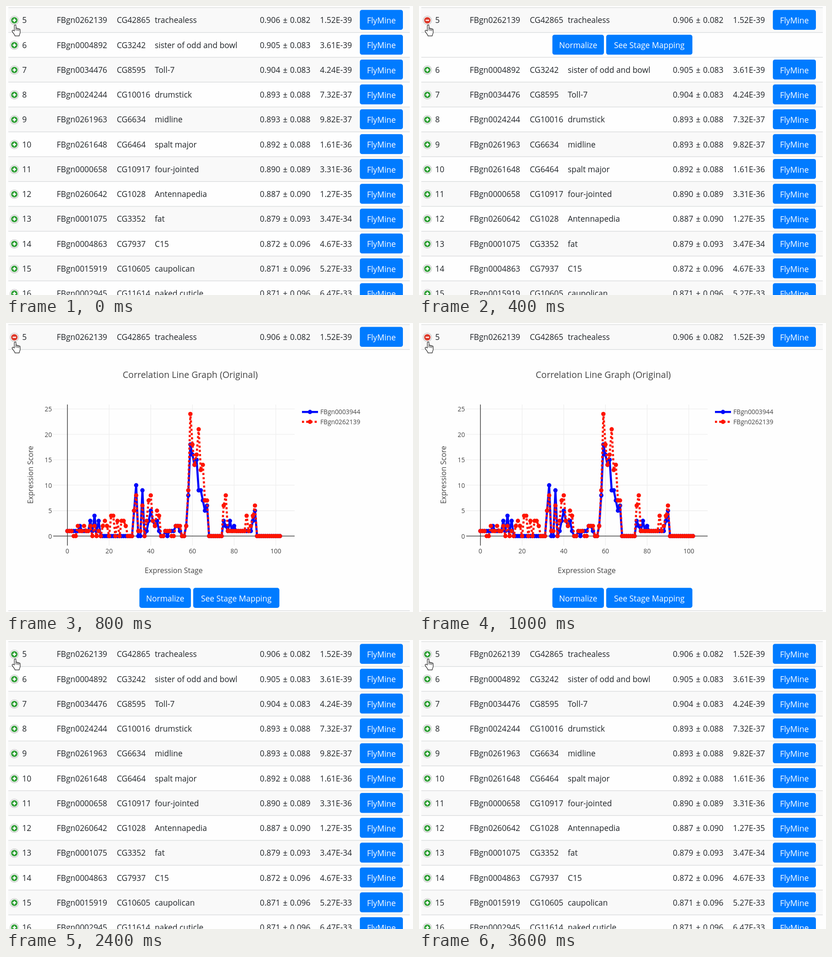
An HTML page that plays this animation: 887 px wide and 631 px high, repeating every 3.8 s.

```html
<!DOCTYPE html>
<html lang="en">
<head>
<meta charset="utf-8">
<title>Correlation table</title>
<style>
  html, body { margin: 0; width: 100%; height: 100%; overflow: hidden; background: #fefefe; }
  svg { display: block; font-family: "Open Sans", "Noto Sans", sans-serif; }
  .cell { font-size: 17.4px; fill: #212529; }
  .score { word-spacing: 1.2px; }
  .label { font-size: 17.4px; fill: #fff; text-anchor: middle; }
  .rule { stroke: #dcdedf; stroke-width: 1.5; }
  .chart text { fill: #444; font-size: 13.76px; }
  .chart .title { font-size: 19.5px; text-anchor: middle; }
  .chart .axis { font-size: 16.05px; text-anchor: middle; }
  .grid { stroke: #eee; stroke-width: 1.3; fill: none; }
  .zero { stroke: #444; stroke-width: 1.5; fill: none; }
  .trace { fill: none; stroke-width: 4.6; stroke-linejoin: round; }
</style>
</head>
<body>
<svg id="stage" width="887" height="631" viewBox="0 0 887 631"></svg>
<script>
const TOP = 3.6, PITCH = 54.25;
const genes = `5|FBgn0262139|CG42865|trachealess|0.906 ± 0.082|1.52E-39
6|FBgn0004892|CG3242|sister of odd and bowl|0.905 ± 0.083|3.61E-39
7|FBgn0034476|CG8595|Toll-7|0.904 ± 0.083|4.24E-39
8|FBgn0024244|CG10016|drumstick|0.893 ± 0.088|7.32E-37
9|FBgn0261963|CG6634|midline|0.893 ± 0.088|9.82E-37
10|FBgn0261648|CG6464|spalt major|0.892 ± 0.088|1.61E-36
11|FBgn0000658|CG10917|four-jointed|0.890 ± 0.089|3.31E-36
12|FBgn0260642|CG1028|Antennapedia|0.887 ± 0.090|1.27E-35
13|FBgn0001075|CG3352|fat|0.879 ± 0.093|3.47E-34
14|FBgn0004863|CG7937|C15|0.872 ± 0.096|4.67E-33
15|FBgn0015919|CG10605|caupolican|0.871 ± 0.096|5.27E-33
16|FBgn0002945|CG11614|naked cuticle|0.871 ± 0.096|6.47E-33`.split("\n").map(s => s.split("|"));
const columns = [35.2, 110.5, 241.4, 324.2, 553.3, 684.3];

// Stage scores, written as value or value x repeat
const scores = {
  blue: "1x6 2 1x4 3 1 4 1 3 0x16 5 10 0x2 9 0 1 3 5 3 2 3 1 0x2 1 0 1x3 2x2 1 0x2 2 8 18 16 14 15 9x2 7 5 6 0x7 3 2 1 3 1 2 1x8 3 5 0x12",
  red: "1x3 0x2 2 1x2 2 1x2 2 0 2 0 1 0 2 3 2 0 4x2 0 3 0 3x2 2 0x3 5 8 1x2 6 0 3 7 8 3 2 5 4 0x2 1x3 0x2 2x3 0x2 2 9 24 18 14 16 21 13 14 7x2 0x7 6 8 1x9 4 1 2 4 6 0x12"
};
const expand = s => s.split(" ").flatMap(t => {
  const [value, count = 1] = t.split("x").map(Number);
  return Array(count).fill(value);
});

const text = (x, y, s, cls = "", more = "") => `<text x="${x}" y="${y}" class="${cls}" ${more}>${s}</text>`;
const rule = y => `<path class="rule" d="M5 ${y}H880"/>`;

function button(x, y, w, s) {
  return `<rect x="${x}" y="${y}" width="${w}" height="43.6" rx="4.6" fill="#007bff"/>` +
    text(x + w / 2, y + 29.6, s, "label");
}

function icon(y, open) {
  return `<g transform="translate(18.2 ${y})">
    <circle r="10.2" fill="#dedede"/><circle r="9.5" fill="#c6c6c6"/><circle r="8.4" fill="#fff"/>
    <circle r="7" fill="${open ? "#dc3b2c" : "#2f9e35"}"/>
    <path d="M-3.7 0H3.7${open ? "" : "M0 -3.7V3.7"}" stroke="#fff" stroke-width="2.5"/></g>`;
}

function row(gene, slot, open) {
  const y = TOP + slot * PITCH;
  const fill = gene[0] % 2 ? "#f9f9f9" : "#fefefe";
  return `<rect x="5" y="${y}" width="875" height="${PITCH}" fill="${fill}"/>` + rule(y) +
    icon(y + 27.6, open) +
    gene.map((s, i) => text(columns[i], y + 33.8, s, i == 4 ? "cell score" : "cell")).join("") +
    button(771.2, y + 4.9, 93.8, "FlyMine");
}

const actions = y => button(290.7, y, 112.3, "Normalize") + button(408, y, 187.8, "See Stage Mapping");

const px = v => 133.8 + v * 4.542;
const py = v => 465.3 - v * 11.11;

function trace(color, data, dash) {
  const points = data.map((v, i) => [px(i), py(v)]);
  return `<polyline class="trace" stroke="${color}" points="${points.join(" ")}" ${dash}/>` +
    points.map(([x, y]) => `<circle cx="${x}" cy="${y}" r="4.7" fill="${color}"/>`).join("");
}

function legend(y, color, name, dash) {
  return `<path class="trace" stroke="${color}" d="M645 ${y}H680" ${dash}/>
    <circle cx="662.5" cy="${y}" r="4.7" fill="${color}"/>` + text(685, y + 5, name);
}

function chart() {
  const blue = "#0008fa", red = "#fe1400", dots = 'stroke-dasharray="4.6 4.6"';
  let s = "";
  for (let v = 0; v <= 25; v += 5) {
    if (v) s += `<path class="grid" d="M103 ${py(v)}H629"/>`;
    s += text(100, py(v) + 5.5, v, "", 'text-anchor="end"');
  }
  for (let v = 0; v <= 100; v += 20) {
    if (v) s += `<path class="grid" d="M${px(v)} 178V486"/>`;
    s += text(px(v), 502.5, v, "", 'text-anchor="middle"');
  }
  return `<g class="chart">${s}
    <path class="zero" d="M${px(0)} 178V486M103 ${py(0)}H629"/>` +
    trace(blue, expand(scores.blue), "") + trace(red, expand(scores.red), dots) +
    legend(194.3, blue, "FBgn0003944", "") + legend(215.8, red, "FBgn0262139", dots) +
    text(401.6, 119.8, "Correlation Line Graph (Original)", "title") +
    text(365.6, 546, "Expression Stage", "axis") +
    text(0, 0, "Expression Score", "axis", 'transform="translate(58.5 331.5) rotate(-90)"') + "</g>";
}

const below = TOP + PITCH;
const first = row(genes[0], 0, true) + rule(below);
const views = [
  genes.map((g, i) => row(g, i, false)).join(""),
  first + actions(below + 4.9) + genes.slice(1, -1).map((g, i) => row(g, i + 2, false)).join(""),
  first + chart() + actions(578.3) + rule(628.3)
];
const hand = `<path d="M18.2 54.5V43.2C18.2 40.7 21.8 40.7 21.8 43.2V49
  C22.3 47.8 24.7 48 25 49.6C25.7 48.6 27.8 48.9 28 50.5C29 49.7 30.9 50.3 30.9 52V57.5
  C30.9 60.5 29.2 61.5 28.8 65.3H19.5C19 62 15 58.5 13.5 55.6C12.5 53.5 14.9 52 16.3 53.3Z
  M21.8 49V53.5M25 49.6V54M28 50.5V54.5" fill="#fff" stroke="#222" stroke-width="1.2" stroke-linejoin="round"/>`;

const stage = document.getElementById("stage");
stage.innerHTML = views.map(v => `<g class="view">${v}</g>`).join("") + hand;
const layers = stage.querySelectorAll(".view");

function draw(now) {
  const t = now % 3800;
  const shown = t < 200 || t >= 2400 ? 0 : t < 800 ? 1 : 2;
  layers.forEach((g, i) => g.style.display = i == shown ? "" : "none");
}

const start = performance.now();
function tick() {
  draw(performance.now() - start);
  requestAnimationFrame(tick);
}
tick();
</script>
</body>
</html>
```
